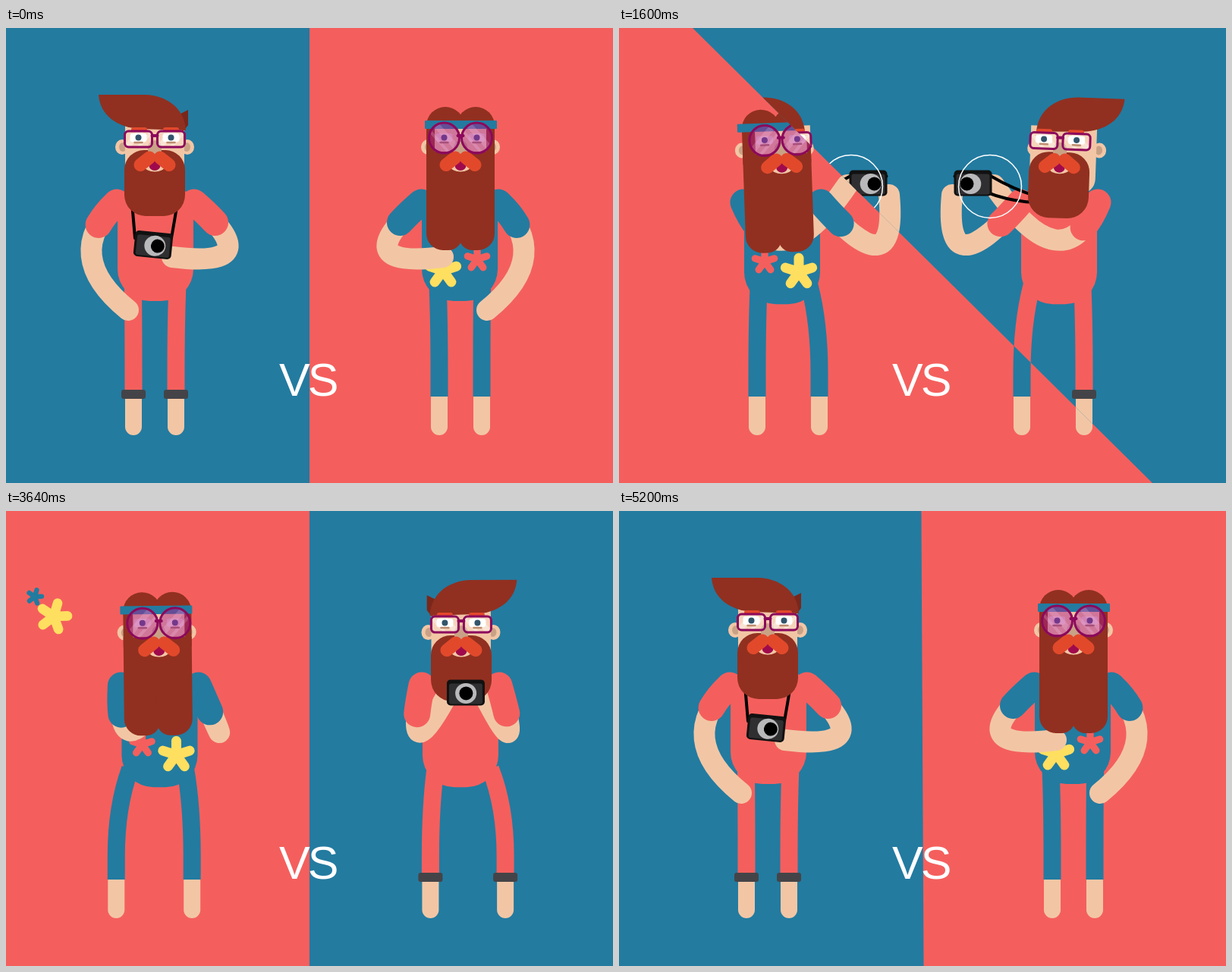
Write an HTML page with a canvas that moves like this. It is 800 px wide and 600 px high and loops after 5240 ms.

```html
<!DOCTYPE html>
<html lang="en">
<head>
<meta charset="utf-8">
<title>VS</title>
<style>
html, body { margin: 0; width: 100%; height: 100%; overflow: hidden; }
canvas { display: block; }
</style>
</head>
<body>
<canvas id="stage" width="800" height="600"></canvas>
<script>
const c = document.getElementById('stage').getContext('2d');
const BLUE = '#237ba0', RED = '#f45f5d', HAIR = '#913020', SKIN = '#f2c6a5',
  ORANGE = '#e2492b', PURPLE = '#8c085c', YELLOW = '#ffdf60', TAN = '#c9a286';
const LOOP = 5240, HALF = LOOP / 2, MID = 196;

const mix = (a, b, u) => a + (b - a) * u;
const mixAll = (a, b, u) => a.map((v, i) => mix(v, b[i], u));
const clamp = u => Math.max(0, Math.min(1, u));
// Smooth step from 0 to 1 between two times.
function ramp(t, from, to) {
  const u = clamp((t - from) / (to - from));
  return u * u * (3 - 2 * u);
}

// Arms as elbow handle and hand; turning outward mirrors turning inward.
const flip = arm => arm.map((v, i) => i % 2 ? v : 2 * MID - v);
const REST = [[72, 300, 161, 372], [350, 318, 219, 302]];
const INWARD = [[210, 340, 301, 207], [368, 347, 356, 220]];
const OUTWARD = [flip(INWARD[1]), flip(INWARD[0])];

function box(x, y, w, h, r, fill) {
  c.beginPath();
  c.roundRect(x, y, w, h, r);
  c.fillStyle = fill;
  c.fill();
}
function oval(x, y, rx, ry, fill) {
  c.beginPath();
  c.ellipse(x, y, rx, ry, 0, 0, 7);
  c.fillStyle = fill;
  c.fill();
}
function stroke(color, width, cap = 'round') {
  c.strokeStyle = color;
  c.lineWidth = width;
  c.lineCap = cap;
  c.stroke();
}
function line(x1, y1, x2, y2, color, width, cap) {
  c.beginPath();
  c.moveTo(x1, y1);
  c.lineTo(x2, y2);
  stroke(color, width, cap);
}

function flower(x, y, r, color, spin = 0) {
  if (r < .3) return;
  for (let i = 0; i < 5; i++) {
    const a = spin - Math.PI / 2 + i * Math.PI * .4, d = r * .74;
    line(x, y, x + d * Math.cos(a), y + d * Math.sin(a), color, r * .52);
  }
}

function leg(torso, side, foot, color, hipster) {
  const hip = torso + side * 20 + (foot - torso) * .33;
  line(foot, 480, foot, 526, SKIN, 22);
  c.beginPath();
  c.moveTo(hip, 340);
  c.quadraticCurveTo(foot, 390, foot, 455);
  c.lineTo(foot, 486);
  stroke(color, 23, 'butt');
  if (hipster) box(foot - 16, 477, 32, 12, 3, '#444448');
}

function arm(shoulder, bend, color) {
  c.beginPath();
  c.moveTo(shoulder, 230);
  c.quadraticCurveTo(...bend);
  stroke(SKIN, 28);
  c.setLineDash([38, 999]);
  stroke(color, 35);
  c.setLineDash([]);
}

function strap(x, y, neck) {
  c.beginPath();
  c.moveTo(x, y);
  c.quadraticCurveTo((x + neck) / 2, (y + 230) / 2 + Math.abs(x - neck) * .15, neck, 230);
  stroke('#000', 4);
}

function camera(x, y, tilt, shift) {
  c.save();
  c.translate(x, y);
  c.rotate(tilt);
  box(-25, -17, 50, 34, 5, '#111');
  box(-22, -12, 44, 27, 3, '#2f2f31');
  oval(shift * .4, 1, 14, 13.5, '#b9b9bb');
  oval(shift, 1, 9, 9, '#000');
  c.restore();
}

function eye(x, hipster) {
  const rim = new Path2D();
  if (hipster) rim.roundRect(x - 18, 136, 36, 21, 5);
  else rim.arc(x, 145, 20, 0, 7);
  box(x - 11, 139, 22, 11, 3, hipster ? '#fff' : '#f8e0da');
  c.save();
  c.clip(rim);
  c.fillStyle = hipster ? 'rgba(255,255,255,.25)' : 'rgba(170,30,140,.48)';
  c.fill(rim);
  const glint = hipster ? 'rgba(255,255,255,.35)' : 'rgba(255,215,245,.2)';
  line(x - 22, 164, x + 14, 124, glint, 8, 'butt');
  line(x - 8, 166, x + 24, 130, glint, 4, 'butt');
  c.restore();
  oval(x, 144.5, 4, 4, hipster ? '#31556b' : '#73388a');
  line(x - 5, 151, x + 5, 151, hipster ? '#bd8d70' : '#a8507c', 2.5);
  c.strokeStyle = PURPLE;
  c.lineWidth = 3;
  c.stroke(rim);
}

function quiff(x, tuft) {
  c.beginPath();
  c.moveTo(tuft + 32, 114);
  c.lineTo(tuft + 44, 108);
  c.lineTo(tuft + 44, 128);
  c.lineTo(tuft + 37, 137);
  c.fillStyle = '#7a271b';
  c.fill();
  c.beginPath();
  c.moveTo(x - 74, 88);
  c.lineTo(x - 12, 88);
  c.bezierCurveTo(x + 14, 89, x + 39, 104, x + 41, 135);
  c.lineTo(x - 20, 133);
  c.bezierCurveTo(x - 50, 131, x - 72, 115, x - 74, 88);
  c.fillStyle = HAIR;
  c.fill();
}

function head(lean, drop, hipster) {
  const face = MID + 19 * lean, skull = MID + 10 * lean, hair = MID + 13 * lean;
  const left = Math.min(skull, face) - 39, right = Math.max(skull, face) + 39;
  c.save();
  c.translate(skull, 190 + drop);
  c.rotate(-.035 * lean);
  c.translate(-skull, -190);
  for (const side of [-1, 1]) {
    oval(skull + side * 43, 157, 9, 10, SKIN);
    oval(skull + side * 42, 157, 5, 6, TAN);
  }
  if (hipster) {
    box(left, 127, right - left, 88, [0, 0, 20, 20], SKIN);
    quiff(skull, skull - 13 * lean);
    for (const side of [-21, 21]) box(face + side - 10, 131, 21, 6, 3, ORANGE);
    box(face - 40, 161, 80, 87, [26, 26, 28, 28], HAIR);
  } else {
    for (const side of [-20, 20]) oval(hair + side, 129, 25, 25, HAIR);
    box(hair - 45, 126, 90, 50, 0, HAIR);
    box(face - 34, 132, 68, 45, 0, SKIN);
    box(hair - 45, 163, 47, 130, [0, 0, 18, 22], HAIR);
    box(hair - 2, 163, 47, 130, [0, 0, 22, 18], HAIR);
    box(skull - 48, 122, 95, 11, 1, BLUE);
  }
  box(face - 9, 148, 18, 22, 9, TAN);
  oval(face, 183, 13, 6.5, SKIN);
  oval(face, 181, 7.5, 7, '#a00a4c');
  for (const side of [-1, 1]) {
    line(face + side * 7, 171, face + side * 19, 180.5, ORANGE, 17);
    eye(face + side * 21.5, hipster);
  }
  line(face - 3.5, 142, face + 3.5, 142, PURPLE, 4);
  c.restore();
}

function ring(x, start, p) {
  const u = (p - start) / 200;
  if (u <= 0 || u >= 1) return;
  c.beginPath();
  c.arc(x, 209, 79 * u, 0, 7);
  stroke(`rgba(255,255,255,${Math.min(1, 3 * (1 - u))})`, 1.5);
}

// A yellow and a blue flower fly from the hand, then shrink away.
function toss(p, start, fade, hand, [yx, yy], [bx, by, br]) {
  const u = 1 - (1 - clamp((p - start) / 220)) ** 3;
  const size = u * (1 - ramp(p, ...fade));
  flower(mix(hand, yx, u), mix(195, yy, u), 28 * size, YELLOW, .28);
  flower(mix(hand, bx, u), mix(195, by, u), br * size, BLUE, .28);
}

function figure(p, hipster, lag = 0) {
  const swing = t => ramp(t - lag, 780, 1180);
  const start = ramp(p, 0, 340);
  const body = start - ramp(p, 1860, 2210), reach = start - ramp(p, 1770, 2210);
  const turned = swing(p), side = 2 * turned - 1, lean = side * body;
  const torso = 197 + 18 * lean, drop = 3 * body, color = hipster ? RED : BLUE;

  const footA = 168 + body * (27 * (2 * swing(p - 90) - 1) - 13);
  const footB = 224 + body * (27 * side + 13);
  leg(torso, -1, footA, color, hipster);
  leg(torso, 1, footB, color, hipster);
  box(torso - 50, 213 + drop, 100, 147 + drop * .4, [20, 20, 42, 42], color);
  if (!hipster) {
    flower(torso + 22, 320 + drop * .6, 25, YELLOW);
    flower(torso - 23, 305 + drop, 18, RED);
  }

  const arms = REST.map((rest, i) => {
    const bend = mixAll(OUTWARD[i], INWARD[i], turned);
    bend[3] += 140 * turned * (1 - turned);
    return mixAll(rest, bend, reach);
  });
  arm(torso - 51, arms[0], color);
  arm(torso + 51, arms[1], color);

  if (!hipster) {
    head(lean, drop, false);
    toss(p, 340, [940, 1300], 85, [63, 139], [38, 113, 14]);
    toss(p, 1460, [1780, 2310], 300, [345, 150], [380, 138, 10]);
    return;
  }
  const x = mix(194, (arms[0][2] + arms[1][2]) / 2, reach);
  const y = mix(286, (arms[0][3] + arms[1][3]) / 2 - 9, reach);
  for (const end of [-1, 1]) strap(x + end * 24, y - 9, MID + 19 * lean + end * 30);
  head(lean, drop, true);
  camera(x, y, .1 * (1 - reach), mix(6, 8 * side, reach));
  ring(86, 560, p);
  ring(306, 1496, p);
}

function pair(t, hipster) {
  const p = t % HALF;
  figure(p, hipster);
  c.save();
  c.translate(795, 0);
  c.scale(-1, 1);
  figure(p, hipster, hipster ? 48 : 0);
  c.restore();
}

// Half a turn: quick start, long settling.
const halfTurn = t => Math.PI * (1 - Math.exp(-((Math.max(0, t) / 380) ** 1.5)));

function draw(t) {
  c.fillStyle = RED;
  c.fillRect(0, 0, 800, 600);
  pair(t, false);

  const angle = halfTurn(t - 1130) + halfTurn(t - 3890);
  c.save();
  c.translate(400, 300);
  c.rotate(angle);
  c.beginPath();
  c.rect(-1000, -1000, 1000, 2000);
  c.rotate(-angle);
  c.translate(-400, -300);
  c.clip();
  c.fillStyle = BLUE;
  c.fillRect(0, 0, 800, 600);
  pair(t, true);
  c.restore();

  c.font = '61px "Liberation Sans", Arial, sans-serif';
  c.letterSpacing = '-3px';
  c.fillStyle = '#fff';
  c.fillText('VS', 360, 485);
}

const begin = performance.now();
function tick() {
  draw((performance.now() - begin) % LOOP);
  requestAnimationFrame(tick);
}
tick();
</script>
</body>
</html>
```
